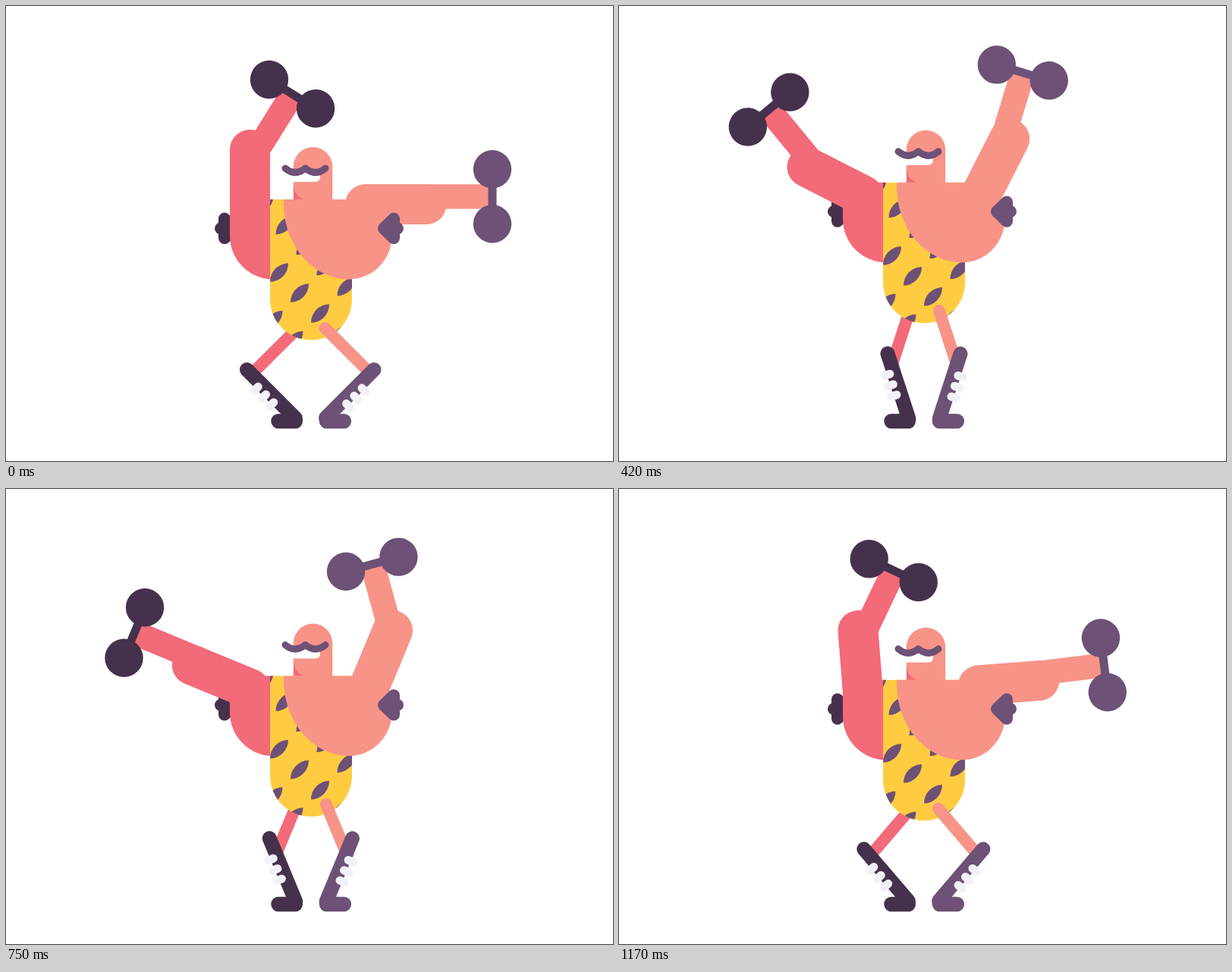
Animation of 800x600 px, one loop 1200 ms. Source, as an HTML page with a canvas:

```html
<!DOCTYPE html>
<html lang="en">
<head>
<meta charset="utf-8">
<title>Strongman</title>
<style>
  html, body { margin: 0; width: 100%; height: 100%; overflow: hidden; background: #fff; }
  canvas { display: block; width: 800px; height: 600px; }
</style>
</head>
<body>
<canvas id="stage" width="800" height="600"></canvas>
<script>
const ctx = document.getElementById('stage').getContext('2d');
const DARK = '#46314c', PURPLE = '#6d5176', PEACH = '#f89387', PINK = '#f36a78',
      YELLOW = '#ffcc41', LACE = '#f3f1f8', WHITE = '#ffffff';
const LOOP = 1200, STEP = 30;
const rad = deg => deg * Math.PI / 180;

const TORSO = new Path2D('M348 255H456V386.5A54 54 0 0 1 348 386.5Z');
const LEFT_CHEST = new Path2D('M349 255H341L321.5 272H295V303A57.5 57.5 0 0 0 349 360.4Z');
const RIGHT_CHEST = new Path2D('M366 255H456L508.5 280V303A57 57.5 0 0 1 451.5 360.5A86 100 0 0 1 366 262Z');
const LEAF = new Path2D('M-12 12.3A24.3 24.3 0 0 1 12 -12.3A24.3 24.3 0 0 1 -12 12.3Z');
const MOUTH = new Path2D('M378 217H414V226A6 6 0 0 1 408 232H378Z');
const NECK_SHADE = new Path2D('M379 236Q380 251 393 255H379Z');
const MOUSTACHE = new Path2D('M368 214Q381 225 394.5 214Q408 225 421 214');

function group(x, y, angle, draw, flip = 1) {
  ctx.save();
  ctx.translate(x, y);
  ctx.scale(flip, 1);
  ctx.rotate(rad(angle));
  draw();
  ctx.restore();
}

function fill(path, color) {
  ctx.fillStyle = color;
  ctx.fill(path);
}

function rect(x, y, w, h, color) {
  ctx.fillStyle = color;
  ctx.fillRect(x, y, w, h);
}

function disc(x, y, r, color) {
  ctx.fillStyle = color;
  ctx.beginPath();
  ctx.arc(x, y, r, 0, 2 * Math.PI);
  ctx.fill();
}

function bar(x1, y1, x2, y2, width, color) {
  ctx.strokeStyle = color;
  ctx.lineWidth = width;
  ctx.lineCap = 'round';
  ctx.beginPath();
  ctx.moveTo(x1, y1);
  ctx.lineTo(x2, y2);
  ctx.stroke();
}

// Body height is linear between keys placed every 300 ms.
function bodyOffset(t) {
  const keys = [0, -47, 15, -31.8, 0];
  const i = Math.floor(t / 300);
  return keys[i] + (keys[i + 1] - keys[i]) * (t / 300 - i);
}

function arm(a, tilt, bend) {
  group(a.x, a.y, tilt, () => {
    bar(0, a.back, 0, -a.upper, 53, a.skin);
    ctx.translate(-10.2, -a.upper - a.elbow);
    ctx.rotate(rad(-bend));
    rect(-16.2, -a.fore, 32.4, a.fore + 10, a.skin);
    rect(-20, -a.fore - 5.5, 40, 11, a.metal);
    disc(-36, -a.fore, 25.2, a.metal);
    disc(36, -a.fore, 25.2, a.metal);
  }, a.side);
}

function thigh(x, y, side, angle, skin) {
  group(x, y, -angle, () => {
    disc(0, -3.5, 7.9, skin);
    rect(-7.9, -3.5, 15.8, 77.5, skin);
  }, side);
}

function boot(b, angle) {
  group(b.x, b.y, angle, () => {
    bar(b.shift, -b.height, b.shift, b.heel, 19, b.color);
    for (let i = 0; i < 3; i++) {
      const y = b.lace + i * 14.5;
      bar(b.laceX - 3.5, y, b.laceX + 3.5, y, 11, LACE);
    }
  }, b.side);
  bar(b.ankle, 547.5, b.toe, 547.5, 19.5, b.color);
}

function tuft(x, y, side, color) {
  group(x, y, 0, () => {
    const path = new Path2D('M-13 0L0 -12.7V12.7Z');
    ctx.lineJoin = 'round';
    ctx.lineWidth = 16;
    ctx.strokeStyle = color;
    ctx.stroke(path);
    fill(path, color);
    disc(5, 0, 8, color);
  }, side);
}

function torso() {
  fill(TORSO, YELLOW);
  ctx.save();
  ctx.clip(TORSO);
  for (let row = -1; row <= 1; row++) {
    for (let col = -2; col <= 4; col++) {
      group(360 - 7.5 * row + 27 * col, 351.5 + 62.5 * row + 27 * col, 0, () => fill(LEAF, PURPLE));
    }
  }
  ctx.restore();
}

function head() {
  disc(404.5, 211.7, 25.7, PEACH);
  rect(378.8, 211.7, 51.4, 43.8, PEACH);
  fill(NECK_SHADE, PINK);
  fill(MOUTH, WHITE);
  ctx.strokeStyle = PURPLE;
  ctx.lineWidth = 9;
  ctx.lineCap = ctx.lineJoin = 'round';
  ctx.stroke(MOUSTACHE);
}

const leftArm = { x: 321.5, y: 272, side: -1, back: 0, upper: 82.5, elbow: 0, fore: 86.5, skin: PINK, metal: DARK };
const rightArm = { x: 482, y: 261.5, side: 1, back: 8.5, upper: 72, elbow: 9, fore: 78, skin: PEACH, metal: PURPLE };
const leftBoot = { x: 379.9, y: 544.9, side: -1, shift: -2.1, height: 90.4, heel: 0,
                   laceX: 6.9, lace: -63.9, ankle: 381.3, toe: 359, color: DARK };
const rightBoot = { x: 423.85, y: 541.8, side: 1, shift: -0.85, height: 87.3, heel: 2.5,
                    laceX: 8.65, lace: -58.8, ankle: 422.5, toe: 445.3, color: PURPLE };

function render(t) {
  const dy = bodyOffset(t);
  const tilt = 90 * (1 - Math.abs(t - 600) / 600);
  const knee = 45 * Math.abs(1 - (t % 600) / 300);
  const swing = Math.min(1, Math.abs(t - 750) / 450);

  rect(0, 0, 800, 600, WHITE);
  thigh(382, 427.2 + dy, -1, knee, PINK);
  boot(leftBoot, knee);
  group(0, dy, 0, () => {
    tuft(288, 293.3, -1, DARK);
    fill(LEFT_CHEST, PINK);
    arm(leftArm, tilt, 32 * swing);
    torso();
    head();
    fill(RIGHT_CHEST, PEACH);
    arm(rightArm, 90 - tilt, 38 * (1 - swing));
    tuft(511, 293.3, 1, PURPLE);
  });
  thigh(423, 427.2 + dy, 1, knee, PEACH);
  boot(rightBoot, knee);
}

const start = performance.now();
function tick() {
  const t = Math.max(0, performance.now() - start) % LOOP;
  render(Math.floor(t / STEP) * STEP);
  requestAnimationFrame(tick);
}
tick();
</script>
</body>
</html>
```
